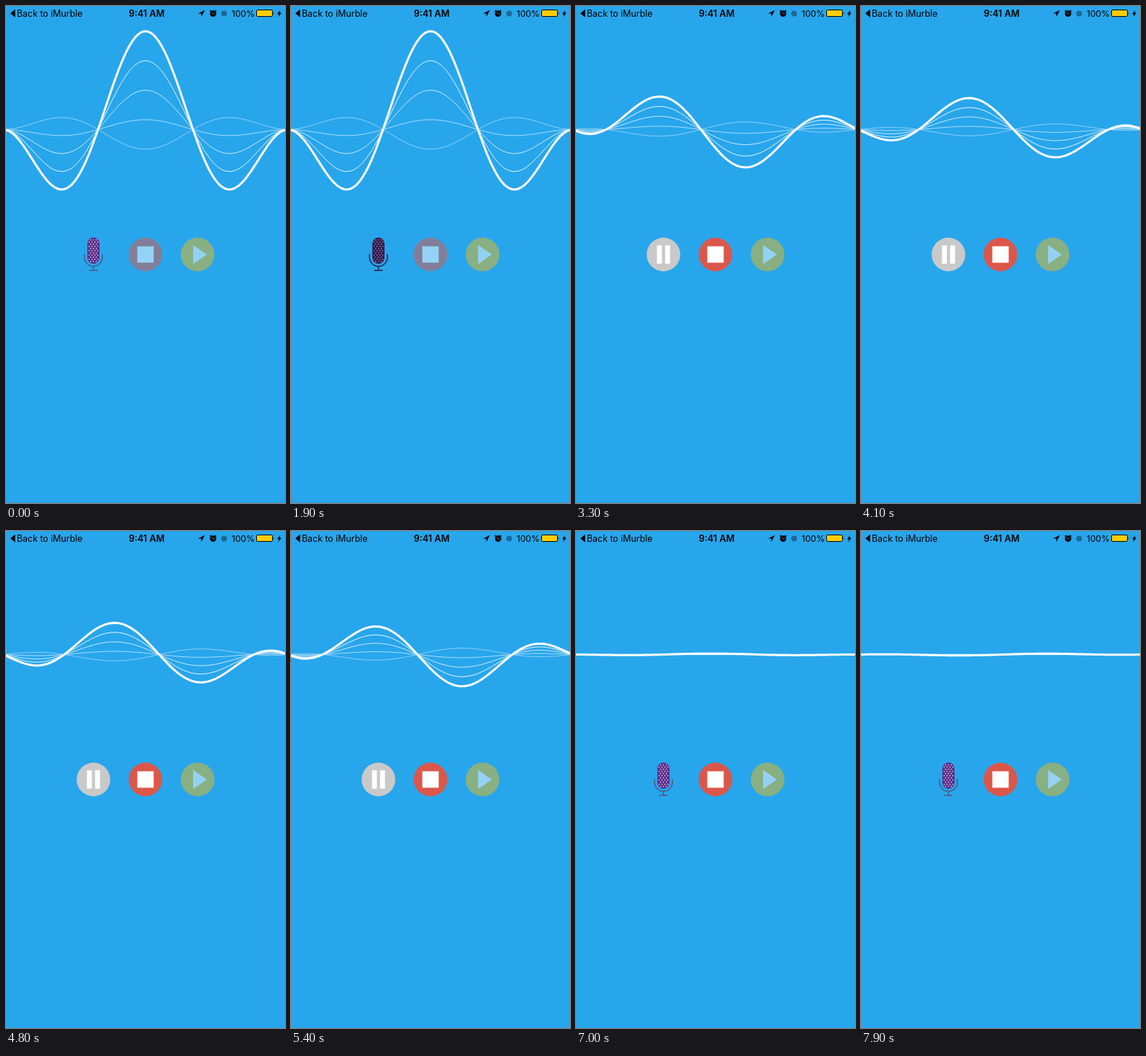
An HTML page for the animation above (8000 ms loop, 388 px wide and 690 px high).

```html
<!DOCTYPE html>
<html lang="en">
<head>
<meta charset="utf-8">
<title>Voice recorder</title>
<style>
  html, body { margin: 0; width: 100%; height: 100%; overflow: hidden; background: #28a6ec; }
  svg { display: block; width: 100vw; height: 100vh; }
  text { font-family: Inter, Roboto, sans-serif; font-size: 12.4px; }
  .time { font-size: 12.7px; font-weight: 600; text-anchor: middle; }
  .percent { font-size: 12.2px; text-anchor: end; }
  #waves { fill: none; stroke: #fff; stroke-linejoin: round; }
  .white { fill: #fff; }
  .off { opacity: .5; }
  .hidden { display: none; }
  #mic { --body: #5b2b86; --dot: #dcc8ea; --stand: #47618c; }
  #mic.pressed { --body: #33184d; --dot: #8f829f; --stand: #28304f; }
  .body { fill: var(--body); }
  .dot { fill: var(--dot); }
  .stand { fill: none; stroke: var(--stand); stroke-width: 1.7; stroke-linecap: round; }
</style>
</head>
<body>
<svg viewBox="0 0 388 690" preserveAspectRatio="none">
  <rect width="388" height="690" fill="#28a6ec"/>

  <g id="status">
    <path d="M6 10.3 12.6 4.8V15.8Z"/>
    <text x="15" y="14.7">Back to iMurble</text>
    <text class="time" x="195.5" y="14.9">9:41 AM</text>
    <path d="M276.5 5.8 267 10.6H271.6V15.2Z"/>
    <circle cx="288" cy="10.6" r="4.4"/>
    <path d="M283.4 7.6 285.4 5.7M292.6 7.6 290.6 5.7" stroke="#000" stroke-width="1.2"/>
    <path d="M286 8.8 288.2 10.8H290.6" fill="none" stroke="#28a6ec" stroke-width=".9"/>
    <circle cx="303.3" cy="10.6" r="4" fill="#1b6a98"/>
    <text class="percent" x="346" y="14.7">100%</text>
    <rect x="348.5" y="5.5" width="22" height="9" rx="1.6" fill="#fc0" stroke="#000"/>
    <path d="M371.8 8.4Q373.6 10 371.8 11.8Z"/>
    <path d="M381.4 5.8 377 11.2H379.6L378.4 15.4 383 9.6H380.4Z"/>
  </g>

  <g id="waves"></g>

  <g id="mic">
    <rect class="body" x="113.2" y="321.4" width="16.8" height="36.6" rx="8.4"/>
    <g id="dots" class="dot"></g>
    <path class="stand" d="M109.2 345V349A12.4 12.4 0 0 0 134 349V345M121.6 361.6V367M116.4 367.2H126.8"/>
  </g>
  <g id="pause">
    <circle cx="121.6" cy="345" r="23.4" fill="#c9c9c9"/>
    <path class="white" d="M112.6 332.2h6.8v25.6h-6.8zM123.9 332.2h6.8v25.6h-6.8z"/>
  </g>
  <g id="stop">
    <circle cx="194" cy="345" r="23.4" fill="#db5749"/>
    <rect class="white" x="182.6" y="333.6" width="22.8" height="22.8"/>
  </g>
  <g class="off">
    <circle cx="266.4" cy="345" r="23.4" fill="#eabb1a"/>
    <path class="white" d="M260.2 331.8 279.2 345 260.2 358.2Z"/>
  </g>
</svg>

<script>
const LOOP = 8000, FRAME = 100;
const PRESS = 1900, RECORD = 2200, PAUSE = 7000;
// The wave view reaches a little past both screen edges
const LEFT = -4, WIDTH = 396, STEP = 4;
const MID_Y = 171.5, MAX_AMP = 136.5, FREQ = 1.5, COUNT = 5;
const PHASE_START = 2132, PHASE_SPEED = 0.009;

// Microphone level over time: [ms, level]
const levels = [
  [2200, .08], [2700, .3], [3300, .405], [4100, .338],
  [5400, .341], [6200, .091], [6700, .014], [7000, .01]
];

const $ = id => document.getElementById(id);

function add(parent, tag, attrs) {
  const el = document.createElementNS('http://www.w3.org/2000/svg', tag);
  for (const key in attrs) el.setAttribute(key, attrs[key]);
  return parent.appendChild(el);
}

function drawDots() {
  for (let row = 0; row < 11; row++) {
    const y = 324.7 + row * 3;
    const edge = row === 0 || row === 10 ? 4.5 : 7;
    for (let x = 121.6 - (row % 2 ? 6 : 4); x < 130; x += 4) {
      if (Math.abs(x - 121.6) < edge) add($('dots'), 'circle', { cx: x, cy: y, r: .85 });
    }
  }
}

const waves = Array.from({ length: COUNT }, (_, i) => {
  const progress = 1 - i / COUNT;
  const path = add($('waves'), 'path', {
    'stroke-width': i ? 1 : 3,
    'stroke-opacity': progress * 2 / 3 + 1 / 3
  });
  return { path, gain: 1.5 * progress - .5 };
});

function levelAt(t) {
  if (t < RECORD) return 1;
  const next = levels.findIndex(([time]) => time > t);
  if (next < 0) return levels[levels.length - 1][1];
  const [t0, a] = levels[next - 1], [t1, b] = levels[next];
  const k = (t - t0) / (t1 - t0);
  return a + (b - a) * k * k * (3 - 2 * k);
}

function wavePath(amp, phase) {
  let d = '';
  for (let x = 0; x <= WIDTH; x += STEP) {
    const u = x / WIDTH;
    const envelope = 1 - (2 * u - 1) ** 2;
    const y = MID_Y + envelope * amp * Math.sin(2 * Math.PI * FREQ * u + phase);
    d += (x ? 'L' : 'M') + (LEFT + x) + ' ' + y.toFixed(2);
  }
  return d;
}

function render(t) {
  const amp = MAX_AMP * levelAt(t);
  const phase = t < RECORD ? 0 : -PHASE_SPEED * (t - PHASE_START);
  for (const { path, gain } of waves) path.setAttribute('d', wavePath(amp * gain, phase));

  const recording = t >= RECORD && t < PAUSE;
  $('mic').classList.toggle('hidden', recording);
  $('mic').classList.toggle('pressed', t >= PRESS && t < RECORD);
  $('pause').classList.toggle('hidden', !recording);
  $('stop').classList.toggle('off', t < RECORD);
}

function tick() {
  const t = performance.now() % LOOP;
  render(Math.floor(t / FRAME) * FRAME);
  requestAnimationFrame(tick);
}

drawDots();
tick();
</script>
</body>
</html>
```
